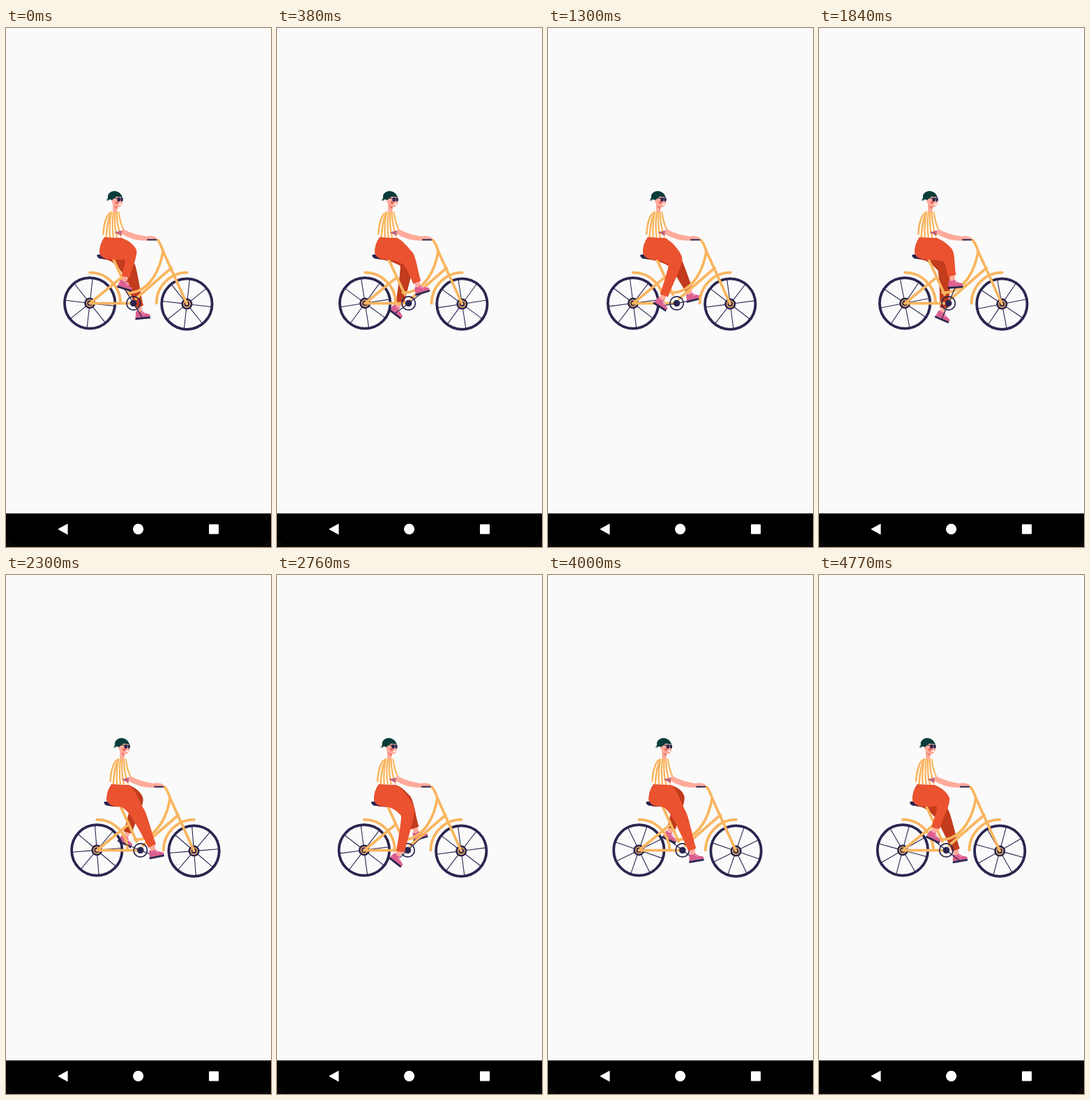
Recreate the animation shown at these times as an HTML page with a canvas. Size 380 by 742 pixels, loop 4.85 s.

```html
<!DOCTYPE html>
<html lang="en">
<head>
<meta charset="utf-8">
<title>Cyclist</title>
<style>
  html, body { margin: 0; width: 100%; height: 100%; overflow: hidden; background: #fafafa; }
  canvas { display: block; }
</style>
</head>
<body>
<canvas id="stage" width="380" height="742"></canvas>
<script>
const ctx = document.getElementById('stage').getContext('2d');
const LOOP = 4850, STEPS = 63, CYCLE = 21;
const C = {
  bg: '#fafafa', navy: '#2a2650', frame: '#f9b55f', pants: '#eb5230', pantsFar: '#c13b1c',
  skin: '#ffab9b', blush: '#ea6a62', hair: '#083c3a', shoe: '#dd5f8f', cuff: '#c4657c', white: '#fff'
};
const REAR = [120, 393.4], FRONT = [259.2, 394.6], CRANK = [182.5, 393.5], HIP = [148, 314];
const NEAR = { color: C.pants, dx: 0, dy: 0, seat: 151 };
const FAR = { color: C.pantsFar, dx: -2, dy: -3, seat: 142 };

// [step, wheel degrees, crank degrees] over one pedal turn
const TURN = [
  [0, 6.5, 238], [3, 79, 293], [10, 244, 397], [11, 269, 433],
  [15, 352.5, 497], [20, 465, 578], [21, 501.5, 598]
];
// [crank degrees, foot tilt, knee x, knee y]
const POSE = [
  [218, 25, 177, 322], [238, 18, 177, 321], [293, -5, 179, 322], [317, -17, 180, 326],
  [397, -10, 178, 343], [416, -7, 177, 345], [433, 5, 176, 346], [471, 22, 178, 342],
  [497, 38, 182, 336], [578, 25, 177, 322]
];

const rad = deg => deg * Math.PI / 180;

function sample(keys, at) {
  let i = 1;
  while (i < keys.length - 1 && keys[i][0] < at) i++;
  const a = keys[i - 1], b = keys[i], u = (at - a[0]) / (b[0] - a[0]);
  return a.slice(1).map((v, j) => v + (b[j + 1] - v) * u);
}

function fill(d, color) {
  ctx.fillStyle = color;
  ctx.fill(new Path2D(d));
}

function line(d, color, width, cap = 'round') {
  ctx.strokeStyle = color;
  ctx.lineWidth = width;
  ctx.lineCap = cap;
  ctx.lineJoin = 'round';
  ctx.stroke(new Path2D(d));
}

function disc(x, y, r, color) {
  ctx.beginPath();
  ctx.arc(x, y, r, 0, 7);
  ctx.fillStyle = color;
  ctx.fill();
}

function ring(x, y, r, color, width) {
  ctx.beginPath();
  ctx.arc(x, y, r, 0, 7);
  ctx.strokeStyle = color;
  ctx.lineWidth = width;
  ctx.stroke();
}

function wheel([x, y], angle) {
  ring(x, y, 36.2, C.navy, 3.8);
  ctx.save();
  ctx.translate(x, y);
  ctx.rotate(rad(angle));
  for (let i = 0; i < 8; i++) {
    line('M0 -6V-36', C.navy, 1.1, 'butt');
    ctx.rotate(Math.PI / 4);
  }
  ctx.restore();
  disc(x, y, 8, C.navy);
}

function hub([x, y]) {
  ring(x, y, 4.6, C.frame, 1.5);
  disc(x, y, 1.8, C.frame);
}

function bikeFrame() {
  line('M120 349.7A44 44 0 0 1 164 393.5M259.5 349.7A44 44 0 0 0 215.5 393.5', C.frame, 3.8);
  line('M120 393.7H182M120 393.7L163 358.5M154 331L177 381', C.frame, 3.8);
  line('M217 303Q221 307 225 319L259 394', C.frame, 3.8);
  line('M225 319C220 349 206 369 189 376Q182 379 174 378M237 343L186 387', C.frame, 3.8);
  hub(REAR);
  hub(FRONT);
  fill('M130 325Q131 323 137 324L152 326Q156 330 151 331L137 330Q131 330 130 325Z', C.navy);
}

function crank(angle) {
  const [x, y] = CRANK, dx = 24 * Math.cos(rad(angle)), dy = 24 * Math.sin(rad(angle));
  line(`M${x - dx} ${y - dy}L${x + dx} ${y + dy}`, C.navy, 1.2);
  ring(x, y, 9.7, C.navy, 1.7);
  disc(x, y, 4.8, C.navy);
}

function foot(x, y, tilt) {
  ctx.save();
  ctx.translate(x, y);
  ctx.rotate(rad(tilt));
  fill('M-7 -19L1 -19L0 -8L-7 -8Z', C.skin);
  fill('M-10 -1L-9 -9Q-8 -12 -6 -10Q-3 -8 0 -11Q4 -6 9 -5Q12 -4 11 -1Z', C.shoe);
  line('M0 -8L3 -10M2 -6L5 -8', C.white, 0.8);
  line('M-10.5 0.2H11', C.navy, 2.8, 'butt');
  ctx.restore();
}

function leg(angle, side) {
  const turn = 218 + ((angle - 218) % 360 + 360) % 360;
  const [tilt, kneeX, kneeY] = sample(POSE, turn);
  const kx = kneeX + side.dx, ky = kneeY + side.dy;
  const px = CRANK[0] + 24.9 * Math.cos(rad(angle)), py = CRANK[1] + 24.9 * Math.sin(rad(angle));
  const s = Math.sin(rad(tilt)), c = Math.cos(rad(tilt));
  const ax = px - 3 * c + 16.5 * s, ay = py - 16.5 * c - 3 * s;
  const unit = (x, y) => [x / Math.hypot(x, y), y / Math.hypot(x, y)];
  const [dx, dy] = unit(ax - HIP[0], ay - HIP[1]);
  const [sx, sy] = unit(ax - kx, ay - ky);
  const kf = [kx + 10.5 * dy, ky - 10.5 * dx];
  const kb = [kx - 11 * dy + 5 * dx, ky + 11 * dx + 5 * dy];
  const af = [ax + 6 * sy, ay - 6 * sx], ab = [ax - 6 * sy, ay + 6 * sx];
  foot(px, py, tilt);
  fill(`M141 299L165 300
    C174 303 ${kf[0] - 9 * dx} ${kf[1] - 9 * dy} ${kf}
    C${kf[0] + 9 * dx} ${kf[1] + 9 * dy} ${af[0] - 12 * sx} ${af[1] - 12 * sy} ${af}
    L${ab}
    C${ab[0] - 10 * sx} ${ab[1] - 10 * sy} ${kb[0] + 5 * dx} ${kb[1] + 5 * dy} ${kb}
    Q${(kb[0] + side.seat) / 2} 332 ${side.seat} 331
    Q136 331 134 321Q134 309 141 299Z`, side.color);
}

function torso() {
  const shirt = 'M150 262Q156 264 162 262Q165 275 168 285L171 291L164 294L166 300L141 299L142 295L138 296Q137 277 146 265Z';
  fill(shirt, C.white);
  ctx.save();
  ctx.clip(new Path2D(shirt));
  line('M147 264Q139.5 278 139 298M150 264Q144 281 143.5 301', C.frame, 2.7);
  line('M151 262Q147 282 149 301M154 262Q151 282 154 301M156.5 262Q154.5 284 159.5 301', C.frame, 2.4);
  line('M159 262Q158 280 165 298M162 262Q162 278 171 293', C.frame, 2.4);
  ctx.restore();
  fill('M155 292L169 289L165 297Z', C.cuff);
  fill('M167 287Q182 295 201 298Q210 296 216 300L215 302L205 304Q181 305 165 294Z', C.skin);
  line('M203 302.8H215', C.navy, 2);
}

function head() {
  fill('M153 249L160 252L159 263Q156 265 153 262Z', C.skin);
  fill('M154 254L160 255L159 259Z', C.blush);
  fill('M151 240L165 240L167 250Q165 257 160 256Q153 255 151 247Z', C.skin);
  disc(159, 249.5, 2.3, C.blush);
  fill('M162 251L166 251Q165 254 162 253Z', C.white);
  fill('M143 247L146 243Q145 239 148 236Q151 233 156 233Q164 234 167 242L158 241Q154 244 152 246L148 245L145 248L146 245Z', C.hair);
  line('M155 243L167 244', C.hair, 1);
  for (const x of [161.5, 166]) {
    ctx.beginPath();
    ctx.ellipse(x, 245.3, x < 163 ? 2.3 : 1.7, 3, 0, 0, 7);
    ctx.fillStyle = C.navy;
    ctx.fill();
  }
}

function navBar() {
  ctx.fillStyle = '#080808';
  ctx.fillRect(0, 694, 380, 48);
  ctx.fillStyle = '#000';
  ctx.beginPath();
  ctx.roundRect(0, 694, 380, 46, [0, 0, 18, 18]);
  ctx.fill();
  const back = 'M75.3 716.5L88 709.4V723.6Z';
  fill(back, C.white);
  line(back, C.white, 1.2);
  disc(189.6, 716.3, 7.6, C.white);
  ctx.fillStyle = C.white;
  ctx.beginPath();
  ctx.roundRect(291, 709.5, 14, 14, 1);
  ctx.fill();
}

function draw() {
  const time = performance.now() % LOOP;
  const step = Math.min(STEPS - 1, Math.floor(time / LOOP * STEPS + 0.17)) % CYCLE;
  const [spin, pedal] = sample(TURN, step);
  const sway = 5.2 * (1 - Math.cos(2 * Math.PI * (step + 0.9) / CYCLE));

  ctx.fillStyle = C.bg;
  ctx.fillRect(0, 0, 380, 742);
  ctx.save();
  ctx.translate(sway, 0);
  leg(pedal + 180, FAR);
  wheel(REAR, spin);
  wheel(FRONT, spin);
  bikeFrame();
  crank(pedal);
  leg(pedal, NEAR);
  torso();
  head();
  ctx.restore();
  navBar();
  requestAnimationFrame(draw);
}
draw();
</script>
</body>
</html>
```
